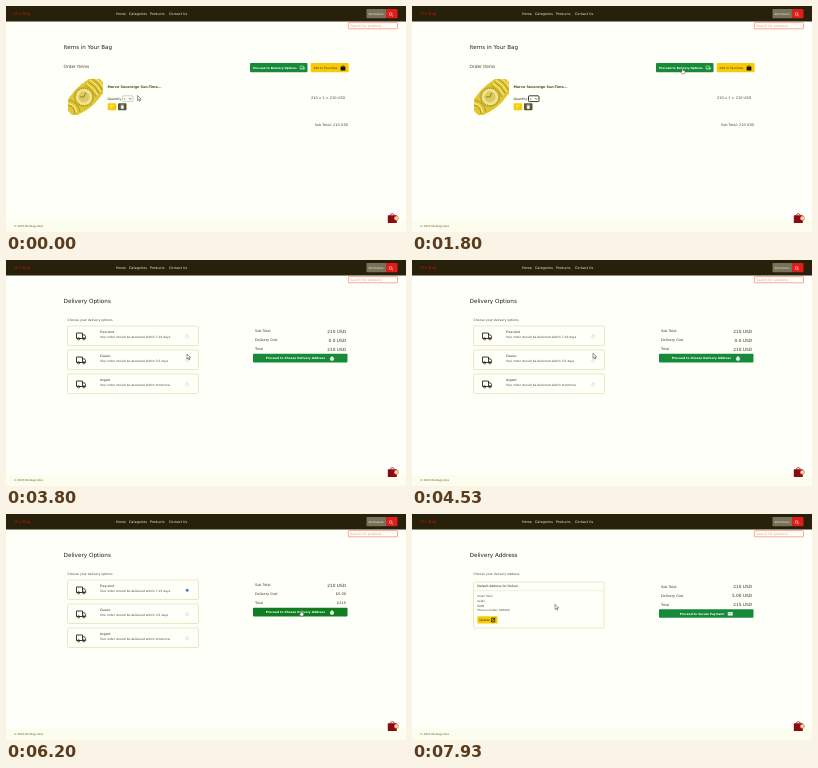
Recreate the animation shown at these times as an HTML page. Size 400 by 226 pixels, loop 8 s.

```html
<!DOCTYPE html>
<html lang="en">
<head>
<meta charset="utf-8">
<title>Checkout</title>
<style>
html, body { margin: 0; width: 100%; height: 100%; overflow: hidden; background: #fffffa; }
svg { display: block; width: 100vw; height: 100vh; font-family: "DejaVu Sans", sans-serif; }
</style>
</head>
<body>
<svg id="stage" viewBox="0 0 400 226"></svg>
<script>
const LOOP = 8000;
const PAPER = '#fffffa', INK = '#24210f', SOFT = '#4b472c', GREEN = '#168a38', DARK_GREEN = '#0f7d1f',
  GOLD = '#f7cb07', LINE = '#dcd99a';

// y is the middle of the line of text
const text = (x, y, size, str, fill = INK, extra = '') =>
  `<text x="${x}" y="${(y + size * .36).toFixed(2)}" font-size="${size}" fill="${fill}" ${extra}>${str}</text>`;
const end = 'text-anchor="end"', bold = 'font-weight="bold"';
const rect = (x, y, w, h, fill, r = 0, extra = '') =>
  `<rect x="${x}" y="${y}" width="${w}" height="${h}" rx="${r}" fill="${fill}" ${extra}/>`;
const line = (d, color, w = .6, fill = 'none') =>
  `<path d="${d}" stroke="${color}" stroke-width="${w}" fill="${fill}" stroke-linejoin="round"/>`;
const at = (x, y, body) => `<g transform="translate(${x} ${y})">${body}</g>`;
const group = (id, body) => `<g id="${id}">${body}</g>`;
const border = (color, w = .6) => `stroke="${color}" stroke-width="${w}"`;

const truck = (x, y, color, s = 1) => at(x, y, `<g transform="scale(${s})">` +
  line('M-4.5 2.5V-3H1.5V2.5H-4.5M1.5-1.2H3.4L4.6.6V2.5H1.5', color, .9) +
  `<g fill="none" stroke="${color}" stroke-width=".8"><circle cx="-2.4" cy="2.8" r="1.1"/><circle cx="2.8" cy="2.8" r="1.1"/></g></g>`);
const bag = (x, y, color, s = 1) => at(x, y, `<g transform="scale(${s})">` +
  rect(-2.5, -1.5, 5, 4.3, color, .3) + line('M-1.1-1.4Q-1.1-2.4 0-2.4T1.1-1.4', color, .4) + '</g>');

function header() {
  return rect(0, 0, 400, 15.5, '#27200a') +
    text(8, 8, 3.9, 'Olvi Bag', '#b3170f') +
    [[110, 'Home'], [123, 'Categories'], [144, 'Products'], [163, 'Contact Us']]
      .map(([x, s]) => text(x, 8, 3.35, s, '#f6f3dc')).join('') +
    rect(360.5, 3, 20, 9.3, '#77735a', .8) + text(362.5, 7.6, 2.6, 'All Products', '#fffbe8') +
    rect(380, 3, 11.5, 9.3, '#df1d1b', .8) +
    '<circle cx="384.6" cy="8" r="1.4" fill="none" stroke="#fff" stroke-width=".5"/>' + line('M385.6 9L387 10.4', '#fff', .5) +
    rect(342.3, 16.6, 49.2, 6.2, PAPER, .6, border('#f4705c', .6)) +
    text(344.3, 19.8, 3.2, 'Search for products', '#f4977c');
}

function footer() {
  return rect(0, 215, 400, 11, '#fdfdee') +
    text(8, 219.8, 2.7, '© 2023 Olvibag store', '#55512f') +
    bag(386.3, 212, '#8c0b12', 1.8) +
    '<circle cx="390.3" cy="212.2" r="2.2" fill="#f6d9a0" stroke="#a3181a" stroke-width=".4"/>';
}

function watch() {
  let links = '';
  for (let i = 0; i < 6; i++) {
    const x = 9 + i * 2.3;
    links += line(`M${x}-8Q${x + 2.5} 0 ${x} 8`, i % 2 ? '#fff6b4' : '#a98e16', .8);
  }
  return rect(62, 73, 35, 36, '#fffff6') +
    '<clipPath id="photo">' + rect(62, 73, 35, 36, '#fff') + '</clipPath><g clip-path="url(#photo)">' +
    '<g transform="translate(78 91) rotate(-43)">' +
    '<path d="M-21-7Q-7-12 6-11L24-9V9L5 12Q-8 13-21 7Z" fill="#dfc634"/>' + links +
    line('M-18-6Q-13 0-18 6M-13-8Q-8 0-13 8', '#a98e16', .8) + line('M-16-6Q-11 0-16 6', '#fff6b4', .9) +
    '<circle r="10.3" fill="#cdb22a"/><circle r="8.6" fill="#efe48c" stroke="#8d7d1b" stroke-width=".9" stroke-dasharray=".8 1.2"/>' +
    '<circle r="5.5" fill="#dccb5c"/>' + line('M-3-3L0 0L4-2', '#776815', .7) + '</g></g>';
}

function bagPage() {
  return text(57.5, 41, 5.55, 'Items in Your Bag') +
    text(57.5, 60.5, 4.35, 'Order Items', SOFT) +
    rect(244, 57, 57.5, 9.2, GREEN, 1) +
    text(247, 61.7, 2.75, 'Proceed to Delivery Options', '#fff', bold) + truck(296.3, 61.5, '#f4fff0', .5) +
    rect(304.7, 57, 38, 9.2, GOLD, 1) + text(307.5, 61.7, 2.95, 'Add to Favorites', '#443600') + bag(337, 61.8, '#171300', .95) +
    watch() +
    text(101.5, 81, 3.35, 'Morvo Sovereign Sun-Time...', '#4a450f', bold) +
    text(101.5, 93, 3.2, 'Quantity') +
    rect(116.5, 89.8, 10.5, 5.8, PAPER, .8, 'id="qty"') + text(118, 92.8, 2.7, '1') + line('M123 92.2L124.2 93.4L125.4 92.2', INK, .6) +
    rect(101.7, 97.2, 8.5, 7, GOLD, .8) + line('M104 102.2L107.8 99M104 99.3H106', '#fff3b0', .7) +
    rect(112, 97.2, 8.5, 7, '#57573c', .8) + line('M114.7 99.2H117.8M115.2 99.8V102.5H117.3V99.8', '#fffde8', .65, '#fffde8') +
    text(339.2, 91.3, 3.55, '210 x 1 = 210 USD', SOFT, end) +
    text(342.3, 119, 3.5, 'Sub Total: 210 USD', SOFT, end);
}

function totals(button, x, size, hoverId) {
  return [['Sub Total', 71], ['Delivery Cost', 80], ['Total', 89]]
      .map(([s, y]) => text(249, y, 3.4, s, '#37341c')).join('') +
    rect(247, 93.8, 94.5, 8.6, GREEN, .8, `id="${hoverId}"`) + text(x, 98.2, size, button, '#fff', bold);
}
const amounts = (...sums) =>
  sums.map((s, i) => text(340, 71 + 9 * i, s[0] === '$' ? 3.6 : 4.3, s, '#37341c', end)).join('');

function optionsPage() {
  const names = ['Free shot', 'Classic', 'Urgent'];
  const when = ['within 7-10 days', 'within 3-5 days', 'within tomorrow'];
  return text(57.5, 41, 5.7, 'Delivery Options') +
    text(61.5, 60, 3.1, 'Choose your delivery options', SOFT) +
    names.map((name, i) => at(0, 24 * i,
      rect(61.5, 66, 131, 19.5, PAPER, 1.2, border(LINE)) + truck(75, 76, '#2b2813') +
      text(94, 71.8, 3.1, name) +
      text(94, 77.4, 2.95, 'Your order should be delivered ' + when[i], SOFT) +
      '<circle cx="181.2" cy="76.3" r="1.5" fill="#fffffa" stroke="#b8b69a" stroke-width=".4"/>')).join('') +
    '<circle id="picked" cx="181.2" cy="76.3" r="1.1" fill="#1767e8" stroke="#1767e8" stroke-width=".4"/>' +
    totals('Proceed to Choose Delivery Address', 259.8, 2.9, 'toAddress') +
    at(326, 98.2, line('M-2 .2L0-1.8L2 .2M-1.3 0V2H1.3V0', '#fff', .7, '#fff')) +
    group('before', amounts('210 USD', '0.0 USD', '210 USD')) +
    group('after', amounts('210 USD', '$5.00', '$215'));
}

function addressPage() {
  const rows = ['Small Town', 'Seldo', '0000', 'Phone number: 000000'];
  return text(57.5, 41, 5.7, 'Delivery Address') +
    text(61.5, 60, 3.1, 'Choose your delivery address', SOFT) +
    rect(61.5, 68, 130.5, 46, PAPER, 1.5, border(LINE)) +
    text(65.2, 72.3, 3.05, 'Default Address for Deliver') + line('M62 76.7H191.7', LINE, .4) +
    rows.map((s, i) => text(65.2, 82.4 + i * 4.65, 2.75, s, SOFT)).join('') +
    rect(65.3, 102.3, 20.2, 7.2, GOLD, .8) + text(67.2, 106, 2.9, 'Update') +
    line('M79.6 104.2H82.7V108H79.6ZM80.3 107L83.2 103.6', '#171300', .75) +
    at(0, 1.4, totals('Proceed to Secure Payment', 267.7, 2.85, 'toPayment') +
      rect(315.8, 96.6, 5, 3.4, '#fff', .4) + line('M315.8 97.8H320.8', DARK_GREEN, .5) +
      amounts('210 USD', '5.00 USD', '215 USD'));
}

const pointer = group('pointer',
  group('arrow', line('M0 0V5L1.2 4L2 5.8L2.9 5.4L2.1 3.7H3.7Z', '#33301f', .5, '#fff')) +
  group('hand', line('M-.5 .2Q0-.5 .5 .2V2L2.3 2.5Q2.9 2.8 2.6 4L2.1 5.5H-.6L-1.8 3.6Q-1.7 3-.5 3.5Z', '#33301f', .4, '#fff')));

document.getElementById('stage').innerHTML = rect(0, 0, 400, 226, PAPER) + header() + footer() +
  group('bagPage', bagPage()) + group('optionsPage', optionsPage()) + group('addressPage', addressPage()) + pointer;

const $ = id => document.getElementById(id);
const show = (id, on) => $(id).setAttribute('display', on ? 'inline' : 'none');
const set = (id, name, value) => $(id).setAttribute(name, value);

// pointer tip: time, x, y
const path = [
  [0, 131.5, 89.5], [150, 131, 90], [450, 122, 92], [1050, 122, 92], [1700, 270.5, 62.3], [2900, 270.5, 62.3],
  [3700, 181, 94], [4450, 181, 94], [5100, 181, 75.5], [5550, 181, 75.5], [6100, 295, 96.5],
  [7150, 296.5, 96.5], [7850, 143, 90.3], [8000, 143, 90.3]
];
function tip(t) {
  const i = path.findIndex(p => p[0] > t);
  const [t0, x0, y0] = path[i - 1], [t1, x1, y1] = path[i];
  const u = (t - t0) / (t1 - t0), k = u * u * (3 - 2 * u);
  return [x0 + (x1 - x0) * k, y0 + (y1 - y0) * k];
}

function draw(t) {
  const page = t < 2950 ? 0 : t < 6570 ? 1 : 2;
  ['bagPage', 'optionsPage', 'addressPage'].forEach((id, i) => show(id, i === page));

  const focused = t >= 500;
  set('qty', 'stroke', focused ? '#24231c' : '#a6a37f');
  set('qty', 'stroke-width', focused ? .9 : .5);

  const picked = t >= 5400;
  show('picked', picked);
  show('before', !picked);
  show('after', picked);

  const [x, y] = tip(t);
  const overBag = page === 0 && x > 244 && y < 66.2;
  const overTotals = page > 0 && x > 247 && y > 93.8 && y < 103.8;
  const fill = overTotals ? DARK_GREEN : GREEN;
  set('toAddress', 'fill', fill);
  set('toPayment', 'fill', fill);

  set('pointer', 'transform', `translate(${x.toFixed(2)} ${y.toFixed(2)})`);
  show('hand', overBag || overTotals);
  show('arrow', !overBag && !overTotals);
}

const start = performance.now();
function tick() {
  draw((performance.now() - start) % LOOP);
  requestAnimationFrame(tick);
}
tick();
</script>
</body>
</html>
```
